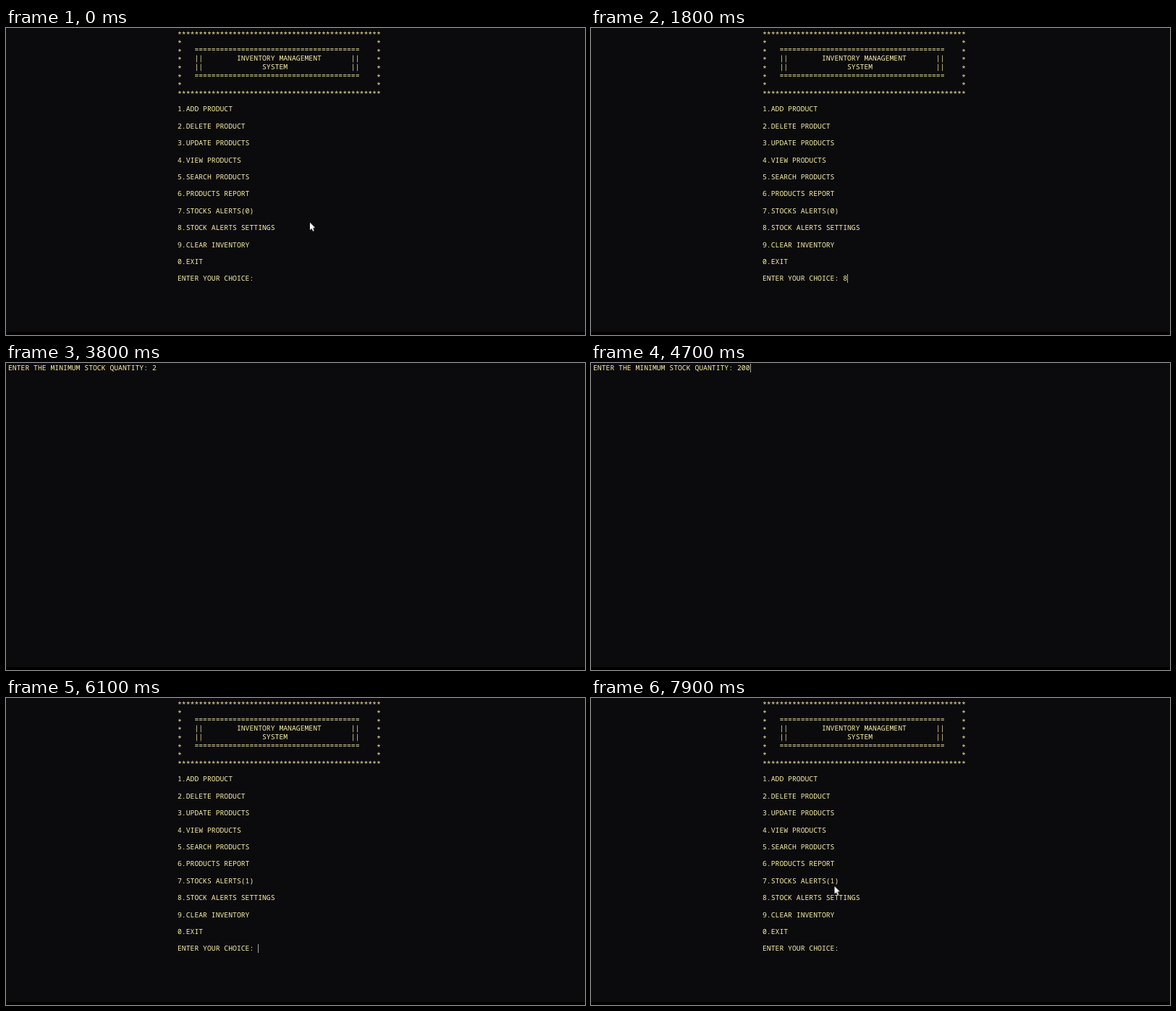
An HTML page that plays this animation: 800x424 px, repeating every 8 s.

```html
<!DOCTYPE html>
<html lang="en">
<head>
<meta charset="utf-8">
<title>Inventory console</title>
<style>
  html, body { margin: 0; width: 100%; height: 100%; overflow: hidden; background: #0b0a0d; }
  .stage { position: relative; width: 800px; height: 424px; overflow: hidden; }
  .stage::after { content: ""; position: absolute; left: 0; right: 0; bottom: 0; height: 4px; background: #030002; }

  pre {
    position: absolute; left: 3px; top: 1px; margin: 0;
    font: 500 9.75px/11.7px "Noto Sans Mono", "DejaVu Sans Mono", monospace;
    font-variant-ligatures: none;
    text-rendering: geometricPrecision;
    color: #f9f1a5;
  }
  pre b { font-weight: inherit; }
  pre i { position: relative; top: 2.2px; font-style: normal; }
  .menu { left: 237px; }
  .done { color: #1cca10; }
  .zero { position: absolute; }

  /* Everything shares one 8 s clock; hard switches use step-end. */
  .menu, .ask, .done, .zero, .one, .key, .caret, .mouse {
    animation-duration: 8s;
    animation-iteration-count: infinite;
    animation-timing-function: step-end;
  }
  .menu { animation-name: menu; }
  .ask { animation-name: ask; }
  .done { animation-name: done; }
  .zero { animation-name: zero; }
  .one { animation-name: one; }
  .choice { animation-name: choice; }
  .digit1 { animation-name: digit1; }
  .digit2 { animation-name: digit2; }
  .digit3 { animation-name: digit3; }

  @keyframes menu { 0% { opacity: 1 } 23.25% { opacity: 0 } 74.6%, 100% { opacity: 1 } }
  @keyframes ask { 0% { opacity: 0 } 23.25% { opacity: 1 } 63.25%, 100% { opacity: 0 } }
  @keyframes done { 0% { opacity: 0 } 63.25% { opacity: 1 } 74.6%, 100% { opacity: 0 } }
  @keyframes zero { 0% { opacity: 1 } 50%, 100% { opacity: 0 } }
  @keyframes one { 0% { opacity: 0 } 50%, 100% { opacity: 1 } }
  @keyframes choice { 0% { opacity: 0 } 18.75% { opacity: 1 } 50%, 100% { opacity: 0 } }
  @keyframes digit1 { 0% { opacity: 0 } 38.75%, 100% { opacity: 1 } }
  @keyframes digit2 { 0% { opacity: 0 } 55%, 100% { opacity: 1 } }
  @keyframes digit3 { 0% { opacity: 0 } 57.5%, 100% { opacity: 1 } }

  .caret {
    position: absolute; left: 0; top: 0; width: 1px; height: 12px;
    background: #a6a6a6;
    animation-name: caret, blink;
  }
  @keyframes caret {
    0% { transform: translate(348px, 340px) }
    18.75% { transform: translate(354px, 340px) }
    23.25% { transform: translate(202px, 1px) }
    38.75% { transform: translate(208px, 1px) }
    55% { transform: translate(214px, 1px) }
    57.5% { transform: translate(220px, 1px) }
    63.25% { transform: translate(190px, 24px) }
    74.6%, 100% { transform: translate(348px, 340px) }
  }
  @keyframes blink {
    0%, 7%, 29.9%, 45.4%, 69.9%, 81.25%, 94.5%, 100% { opacity: 0 }
    0.6%, 13.6%, 36.5%, 52%, 74.6%, 87.9% { opacity: 1 }
  }

  .mouse {
    position: absolute; left: 0; top: 0; width: 10px; height: 14px; overflow: visible;
    fill: #fff;
    animation-name: move, presence;
    animation-timing-function: linear, step-end;
  }
  @keyframes move {
    0% { transform: translate(420px, 268.5px) }
    7.5% { transform: translate(379px, 340px) }
    10.5%, 80% { transform: translate(375px, 359.5px) }
    80% { animation-timing-function: ease-in-out }
    94%, 100% { transform: translate(336.5px, 260px) }
  }
  @keyframes presence { 0% { opacity: 1 } 18.75% { opacity: 0 } 80%, 100% { opacity: 1 } }
</style>
</head>
<body>
<div class="stage">
<pre class="menu"><i>************************************************</i>
<i>*                                              *</i>
<i>*</i>   =======================================    <i>*</i>
<i>*</i>   ||        INVENTORY MANAGEMENT       ||    <i>*</i>
<i>*</i>   ||              SYSTEM               ||    <i>*</i>
<i>*</i>   =======================================    <i>*</i>
<i>*                                              *</i>
<i>************************************************</i>

1.ADD PRODUCT

2.DELETE PRODUCT

3.UPDATE PRODUCTS

4.VIEW PRODUCTS

5.SEARCH PRODUCTS

6.PRODUCTS REPORT

7.STOCKS ALERTS(<b class="zero">0</b><b class="one">1</b>)

8.STOCK ALERTS SETTINGS

9.CLEAR INVENTORY

0.EXIT

ENTER YOUR CHOICE: <b class="key choice">8</b></pre>
<pre class="ask">ENTER THE MINIMUM STOCK QUANTITY: <b class="key digit1">2</b><b class="key digit2">0</b><b class="key digit3">0</b></pre>
<pre class="done">SETTINGS UPDATED SUCCESSFULLY :)

Press any key to continue . . . </pre>
<div class="caret"></div>
<svg class="mouse" viewBox="0 0 10 14"><path d="M0 0V10.4L2.4 8.2L4.1 12L5.8 11.2L4.1 7.6L7.2 7.3Z"/></svg>
</div>
</body>
</html>
```
